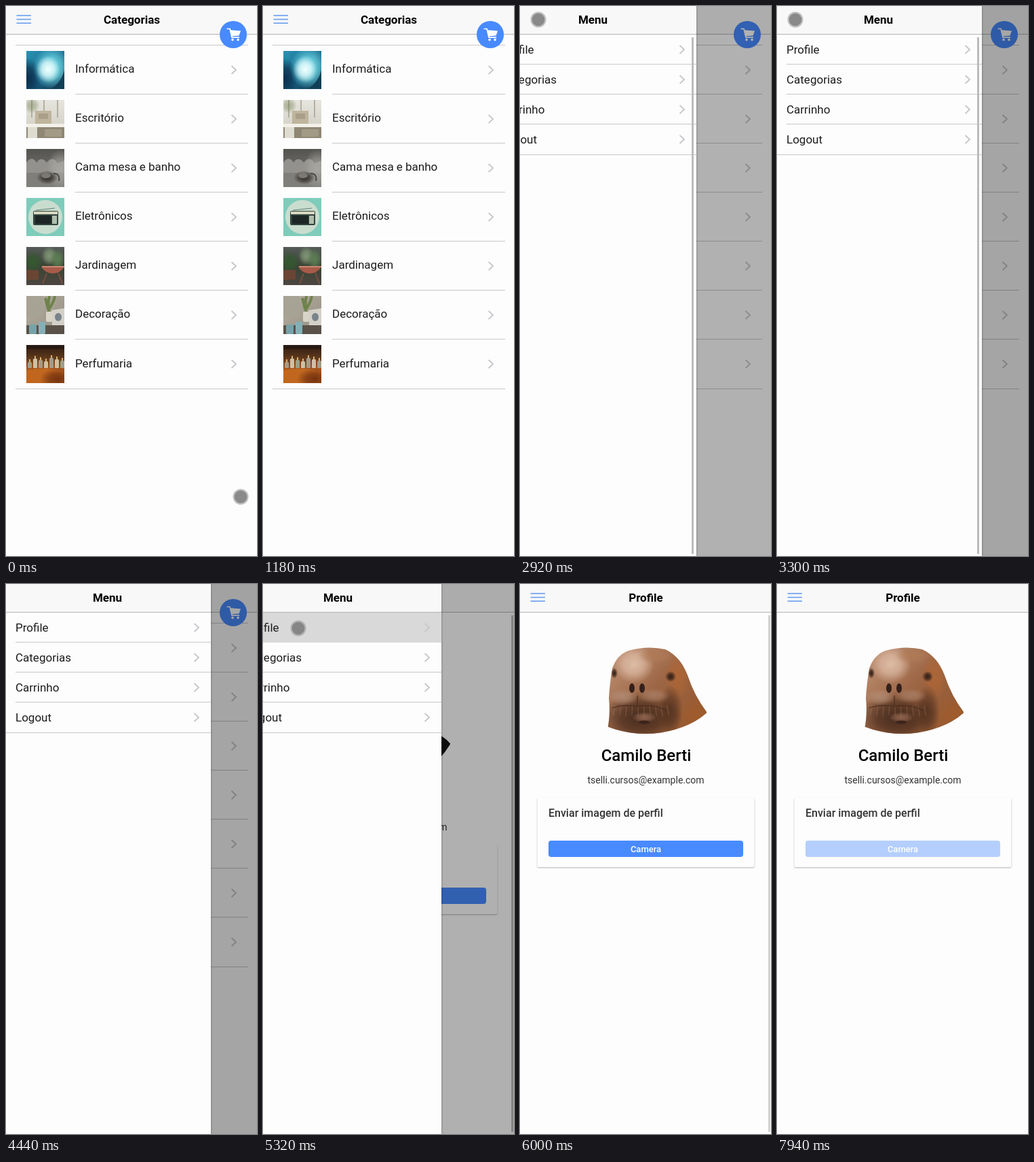
Animation, 370 px wide and 808 px high, one loop 7990 ms. Source, as an HTML page with a canvas:

```html
<!DOCTYPE html>
<html lang="pt">
<head>
<meta charset="utf-8">
<title>Categorias</title>
<style>
html, body { margin: 0; width: 100%; height: 100%; overflow: hidden; background: #fdfdfd; }
canvas { display: block; width: 370px; height: 808px; }
</style>
</head>
<body>
<canvas id="stage"></canvas>
<script>
const W = 370, H = 808, LOOP = 7990, MENU_W = 302;
const PAGE = '#fdfdfd', BAR = '#f8f8f8', INK = '#000', BODY = '#1c1c1c', LINE = '#c8c7cc', BLUE = '#488aff';
const OPEN = 2772, CLOSE = 5253, SLIDE = 280, PHOTO_IN = 5600;
const FONT = 'Roboto, "Noto Sans", sans-serif';

const canvas = document.getElementById('stage');
const dpr = window.devicePixelRatio || 1;
canvas.width = W * dpr;
canvas.height = H * dpr;
const c = canvas.getContext('2d');

const clamp = v => Math.max(0, Math.min(1, v));
const ramp = (t, a, b) => clamp((t - a) / (b - a));

// cubic-bezier(x1, 0, x2, 1)
function ease(p, x1, x2) {
  let lo = 0, hi = 1, s = p;
  for (let i = 0; i < 24; i++) {
    s = (lo + hi) / 2;
    const x = 3 * (1 - s) * (1 - s) * s * x1 + 3 * (1 - s) * s * s * x2 + s * s * s;
    if (x < p) lo = s; else hi = s;
  }
  return 3 * s * s - 2 * s * s * s;
}

function rect(x, y, w, h, fill) {
  c.fillStyle = fill;
  c.fillRect(x, y, w, h);
}

function oval(x, y, rx, ry, fill) {
  c.fillStyle = fill;
  c.beginPath();
  c.ellipse(x, y, rx, ry, 0, 0, Math.PI * 2);
  c.fill();
}

function poly(points, fill) {
  c.fillStyle = fill;
  c.beginPath();
  for (let i = 0; i < points.length; i += 2) c.lineTo(points[i], points[i + 1]);
  c.fill();
}

function round(x, y, w, h, r, fill) {
  c.fillStyle = fill;
  c.beginPath();
  c.roundRect(x, y, w, h, r);
  c.fill();
}

function shape(d, fill) {
  c.fillStyle = fill;
  c.fill(new Path2D(d));
}

function stroke(d, color, width) {
  c.strokeStyle = color;
  c.lineWidth = width;
  c.stroke(new Path2D(d));
}

// Soft blob of an "r,g,b" colour
function glow(x, y, rx, ry, rgb, alpha) {
  c.save();
  c.translate(x, y);
  c.scale(rx, ry);
  const g = c.createRadialGradient(0, 0, 0, 0, 0, 1);
  g.addColorStop(0, `rgba(${rgb},${alpha})`);
  g.addColorStop(.5, `rgba(${rgb},${alpha * .7})`);
  g.addColorStop(1, `rgba(${rgb},0)`);
  oval(0, 0, 1, 1, g);
  c.restore();
}

function text(str, x, y, size, weight = 400, color = BODY, align = 'left') {
  c.font = `${weight} ${size}px ${FONT}`;
  c.fillStyle = color;
  c.textAlign = align;
  c.fillText(str, x, y);
}

function fade(list, diagonal) {
  const g = c.createLinearGradient(0, 0, diagonal ? 56 : 0, 56);
  list.forEach((color, i) => g.addColorStop(i / (list.length - 1), color));
  return g;
}

function chevron(x, y) {
  stroke(`M${x - 3.5} ${y - 6}l6.5 6l-6.5 6`, LINE, 1.9);
}

function header(title, w) {
  rect(0, 0, w, 41, BAR);
  rect(0, 41, w, 1, '#b4b4b4');
  text(title, w === MENU_W ? 149.5 : 185.5, 26, 17, 600, INK, 'center');
}

function burger() {
  for (const y of [13.2, 18.8, 24.4]) rect(15.5, y, 21.5, 1.6, '#6c9ff0');
}

function cart() {
  oval(335, 42, 20, 20, BLUE);
  stroke('M325.5 33.5H330L333 46.2H344', '#fff', 1.7);
  poly([330, 35.3, 346, 36.5, 343.5, 43.4, 332, 44.4], '#fff');
  oval(334, 49.6, 1.8, 1.8, '#fff');
  oval(342, 49.6, 1.8, 1.8, '#fff');
}

// Flat 56 x 56 thumbnails
const thumbs = [
  () => {
    rect(0, 0, 56, 56, fade(['#2b93b4', '#1c6c90', '#0a2238'], true));
    glow(2, 40, 20, 30, '8,38,66', .9);
    glow(38, 25, 28, 32, '110,220,232', 1);
    glow(32, 27, 18, 20, '240,255,255', 1);
    shape('M56 28Q52 46 36 56H56Z', '#123f58');
  },
  () => {
    rect(0, 0, 56, 56, fade(['#e6e6de', '#cdcabd']));
    for (const x of [7, 25, 45]) rect(x, 0, 2, 26, '#b4b0a2');
    glow(8, 8, 12, 12, '110,125,80', .5);
    rect(13, 16, 24, 20, '#bfb49c');
    rect(18, 20, 14, 8, '#aaa08a');
    rect(0, 36, 56, 20, '#8f8674');
    rect(0, 35, 56, 5, '#f2f0e8');
    rect(2, 40, 14, 16, '#dedbd0');
    rect(27, 43, 25, 11, '#a39a86');
  },
  () => {
    rect(0, 0, 56, 56, fade(['#55534f', '#6c6a67', '#85837f']));
    shape('M0 20Q8 9 15 20Q22 10 30 20Q39 9 46 21L56 17V38H0Z', '#93918d');
    rect(0, 35, 56, 21, '#807e7a');
    glow(50, 30, 20, 30, '175,173,168', .7);
    glow(31, 42, 16, 10, '50,47,44', 1);
    oval(29, 39, 7, 4, '#7b7874');
    stroke('M40 36Q50 36 48 47', '#4a4743', 2);
  },
  () => {
    rect(0, 0, 56, 56, '#7fccbb');
    oval(28, 28, 25, 25, '#c9ddcf');
    stroke('M14 18L42 15', '#5f7f75', 1.2);
    round(10, 19, 37, 21, 2, '#33443f');
    rect(11, 20, 35, 4, '#d8d8c0');
    rect(13, 26, 24, 12, '#1d2625');
    rect(38, 26, 7, 12, '#aebfae');
  },
  () => {
    rect(0, 0, 56, 56, fade(['#555a58', '#3a4434', '#4c4640']));
    glow(10, 22, 14, 16, '52,88,48', 1);
    glow(34, 13, 12, 14, '128,150,116', 1);
    glow(46, 18, 11, 16, '92,128,84', 1);
    rect(0, 34, 18, 14, '#6b4534');
    shape('M22 29H56Q50 39 38 39Q27 38 22 29Z', '#a85a48');
    rect(23, 28, 33, 2, '#c98a72');
    stroke('M30 39L24 54M47 38L53 54', '#7a4f40', 2);
  },
  () => {
    rect(0, 0, 56, 56, fade(['#b4afa2', '#948d80'], true));
    rect(0, 0, 24, 30, '#a6a294');
    stroke('M34 28Q31 12 34 0M33 20Q41 8 42 0M32 19L28 3', '#70824c', 4);
    round(29, 23, 9, 15, 2, '#d8d4c8');
    poly([37, 21, 56, 18, 56, 44, 38, 43], '#d4d0c8');
    oval(47, 31, 5, 6, '#78838a');
    rect(0, 43, 56, 13, '#5a5248');
    round(4, 42, 11, 14, 2, '#76a3aa');
    round(18, 38, 10, 18, 2, '#84b0b6');
  },
  () => {
    rect(0, 0, 56, 56, fade(['#2e1c12', '#5c381c', '#b0581f', '#8a3e12']));
    rect(0, 0, 56, 6, '#281a12');
    for (let i = 0; i < 7; i++) {
      const x = 2 + i * 8, h = 9 + (i * 5) % 7;
      round(x, 34 - h, 6, h, 1.5, i % 2 ? '#cfc0a2' : '#a39c88');
      rect(x + 2, 30 - h, 2, 4, '#d8b070');
    }
    shape('M0 37Q28 31 56 39V56H0Z', '#c0661f');
    glow(46, 50, 26, 16, '110,46,14', .9);
  }
];
const labels = ['Informática', 'Escritório', 'Cama mesa e banho', 'Eletrônicos', 'Jardinagem', 'Decoração', 'Perfumaria'];

function categories() {
  rect(14, 57, 343, 1, LINE);
  labels.forEach((label, i) => {
    const y = Math.floor(i * 72.17);
    c.save();
    c.translate(30, 66 + i * 72);
    c.beginPath();
    c.rect(0, 0, 56, 56);
    c.clip();
    thumbs[i]();
    c.restore();
    text(label, 102, 98 + y, 17);
    chevron(336, 94 + i * 72);
    if (i < 6) rect(102, 129 + y, 255, 1, LINE);
  });
  rect(14, 562, 343, 1, LINE);
  header('Categorias', W);
  burger();
  cart();
}

function walrus() {
  const skin = c.createLinearGradient(135, 95, 260, 215);
  skin.addColorStop(0, '#c09478');
  skin.addColorStop(.5, '#9c6544');
  skin.addColorStop(1, '#95582e');
  c.save();
  c.clip(new Path2D('M127 222Q134 196 131 168Q132 148 136 124Q143 104 160 98Q188 90 214 96Q236 106 247 134Q257 164 275 188V222Z'));
  rect(120, 85, 160, 140, skin);
  glow(168, 118, 30, 28, '226,194,172', .9);
  glow(200, 106, 26, 12, '176,122,86', .8);
  glow(232, 136, 18, 36, '176,102,52', .8);
  glow(262, 196, 28, 30, '160,92,44', .9);
  glow(178, 196, 62, 38, '66,40,28', .95);
  glow(222, 184, 18, 36, '74,44,28', .7);
  glow(152, 166, 22, 12, '178,140,116', .85);
  glow(197, 164, 24, 11, '168,126,100', .85);
  glow(183, 196, 18, 8, '158,112,88', .8);
  for (let i = 0; i < 10; i++) stroke(`M${140 + i * 8.5} ${178 + i % 3}l${(i - 4) * .6} 15`, 'rgba(190,150,122,.4)', .8);
  stroke('M173 164V178M136 182Q154 176 174 180Q198 176 216 186', 'rgba(70,42,28,.7)', 1.5);
  oval(183, 203, 8, 2.5, '#3c241a');
  oval(165, 153, 4, 7, '#35201a');
  oval(180, 153, 4, 7, '#35201a');
  glow(139, 131, 5, 8, '48,30,22', 1);
  glow(222, 136, 8, 8, '48,30,22', 1);
  c.restore();
}

function avatar(loaded) {
  c.save();
  c.beginPath();
  const ry = loaded ? 81 : 115.5;
  c.ellipse(185, 58 + ry, loaded ? 115 : 107.5, ry, 0, 0, Math.PI * 2);
  c.clip();
  if (loaded) walrus();
  else {
    oval(185, 145, 42, 52, '#111');
    shape('M75 290Q82 234 110 222L160 200H210L260 222Q288 234 295 290Z', '#111');
  }
  c.restore();
}

function profile(t) {
  const loaded = t >= PHOTO_IN;
  avatar(loaded);
  c.save();
  c.translate(0, loaded ? 0 : 69);
  text('Camilo Berti', 186, 260, 24, 500, INK, 'center');
  text('tselli.cursos@example.com', 185.5, 293, 14, 400, '#333', 'center');
  c.save();
  c.shadowColor = 'rgba(0,0,0,.3)';
  c.shadowBlur = 2 * dpr;
  c.shadowOffsetY = dpr;
  round(25.5, 314, 320, 102, 2, PAGE);
  c.restore();
  text('Enviar imagem de perfil', 42, 342, 16, 500, '#333');
  c.globalAlpha = 1 - .6 * ramp(t, 7230, 7400);
  round(42, 377, 287, 24, 4, BLUE);
  c.globalAlpha = 1;
  text('Camera', 185.5, 394, 13, 500, '#fff', 'center');
  c.restore();
  header('Profile', W);
  burger();
  scrollbar(366, 1 - ramp(t, 5900, 6210));
}

function scrollbar(x, alpha) {
  if (alpha <= 0) return;
  c.globalAlpha = alpha;
  rect(x, 46, 3, 759, '#bcbcbc');
  c.globalAlpha = 1;
}

function menu(t, k) {
  rect(0, 0, W, H, `rgba(0,0,0,${.01 + .34 * k})`);
  c.save();
  c.translate(Math.round(-MENU_W * (1 - k)), 0);
  c.save();
  c.shadowColor = 'rgba(0,0,0,.4)';
  c.shadowBlur = 3 * dpr;
  rect(0, 0, MENU_W, H, PAGE);
  c.restore();
  const active = t >= 5050;
  if (active) rect(0, 42, MENU_W, 44, '#d9d9d9');
  ['Profile', 'Categorias', 'Carrinho', 'Logout'].forEach((label, i) => {
    const y = i * 44;
    text(label, 14, 70 + y, 17);
    chevron(281, 64 + y);
    if (i < 3 && !(active && i === 0)) rect(14, 85 + y, MENU_W - 14, 1, LINE);
  });
  rect(0, 218, MENU_W, 1, LINE);
  header('Menu', MENU_W);
  scrollbar(295, 1 - ramp(t, 3420, 3700));
  c.restore();
}

// Touch dots: start, end, x, y, and drift while held
const touches = [
  [0, 1180, 346, 721, 0, 0],
  [2240, 3380, 27, 20, 0, 0],
  [4720, 5600, 52, 65, 0, 0],
  [6680, 7940, 191, 384, 2, 7]
];

function touch(t) {
  for (const [from, to, x, y, dx, dy] of touches) {
    if (t < from || t >= to) continue;
    const move = ramp(t, from, from + 330);
    const px = x + dx * move, py = y + dy * move;
    oval(px, py, 11.5, 11.5, 'rgba(150,150,150,.6)');
    oval(px, py, 9.3, 9.3, 'rgba(115,115,115,.7)');
  }
}

function draw(t) {
  c.setTransform(dpr, 0, 0, dpr, 0, 0);
  rect(0, 0, W, H, PAGE);
  if (t < CLOSE) categories(); else profile(t);
  if (t >= OPEN && t < CLOSE + SLIDE) {
    const k = t < CLOSE
      ? ease(ramp(t, OPEN, OPEN + SLIDE), 0, .2)
      : 1 - ease(ramp(t, CLOSE, CLOSE + SLIDE), .4, .6);
    menu(t, k);
  }
  touch(t);
}

const start = performance.now();
function tick() {
  draw((performance.now() - start) % LOOP);
  requestAnimationFrame(tick);
}
tick();
</script>
</body>
</html>
```
